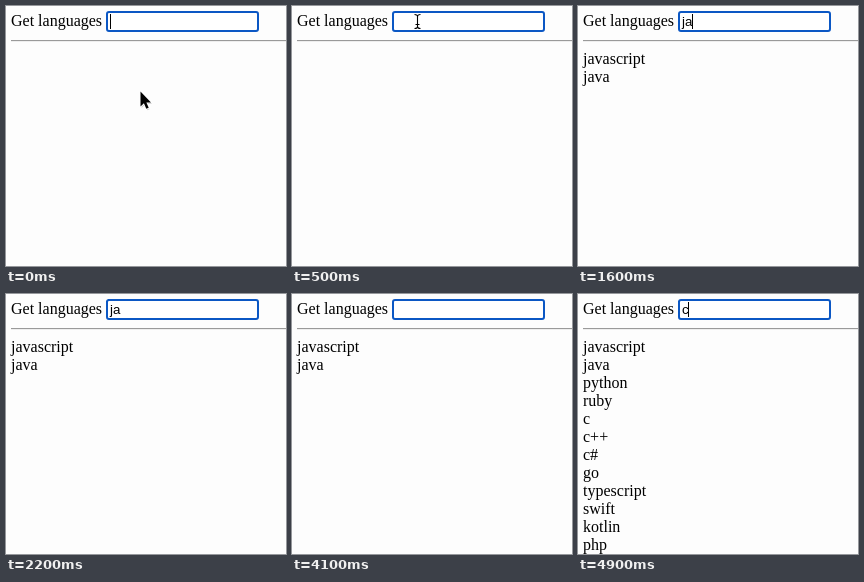
Recreate the animation shown at these times as an HTML page. Size 280 by 260 pixels, loop 5 s.

```html
<!DOCTYPE html>
<html lang="en">
<head>
<meta charset="utf-8">
<title>Language filter</title>
<style>
  html, body { margin: 0; height: 100%; overflow: hidden; background: #fdfdfd; }
  svg { display: block; }
  text { font: 16px "Liberation Serif", "Times New Roman", serif; }
  #typed { font: 13.333px "Liberation Sans", Arial, sans-serif; }
</style>
</head>
<body>
<svg width="280" height="260" viewBox="0 0 280 260">
  <text x="5" y="20">Get languages</text>
  <rect x="101" y="6" width="151" height="19" rx="2" fill="#fff" stroke="#0b57c4" stroke-width="2"/>
  <path d="M5 34.5H280" stroke="#9a9a9a"/>
  <path d="M5 35.5H280" stroke="#eee"/>
  <g id="list"></g>
  <text id="typed" x="104" y="20"></text>
  <rect id="caret" y="8" width="1" height="15"/>
  <g id="arrow" stroke-linejoin="round">
    <path d="M1 1.5V16.5L4.4 13.3L6.8 18.8L9.2 17.8L6.9 12.5H11.5Z" fill="#000" opacity=".18"/>
    <path d="M0 0V15L3.4 11.8L5.8 17.3L8.2 16.3L5.9 11H10.5Z" stroke="#fff" stroke-width="1.6" paint-order="stroke"/>
  </g>
  <g id="beam" fill="none">
    <path d="M-3-7Q0-7 0-5Q0-7 3-7M0-5V5M-3 7Q0 7 0 5Q0 7 3 7M-2 3H2" stroke="#fff" stroke-width="2.4"/>
    <path d="M-3-7Q0-7 0-5Q0-7 3-7M0-5V5M-3 7Q0 7 0 5Q0 7 3 7M-2 3H2" stroke="#000" stroke-width="1.1"/>
  </g>
</svg>
<script>
const LOOP = 5000, STEP = 100;
const $ = id => document.getElementById(id);
const languages = "javascript java python ruby c c++ c# go typescript swift kotlin php".split(" ");

// Each track lists [start time, value]
const typing = [[0, ""], [1200, "j"], [1300, "ja"], [3200, "j"], [4100, ""], [4900, "c"]];
const results = [[0, 0], [1600, 2], [4400, languages.length]];
const blink = [[0, 1], [500, 0], [1000, 1], [1500, 0], [1600, 1], [2000, 0],
  [2500, 1], [3000, 0], [3500, 1], [4000, 0], [4500, 1]];
const caretX = { "": 104, j: 106, ja: 114, c: 110 };
const path = [[134.5, 85.5], [137, 78], [137, 60], [133, 38], [127, 20], [125.5, 15.5], [133.5, 12.5], [150.5, 0.5]];

const at = (track, t) => track.findLast(([start]) => start <= t)[1];
const show = (el, on) => el.setAttribute("visibility", on ? "visible" : "hidden");

const rows = languages.map((name, i) => {
  const row = document.createElementNS("http://www.w3.org/2000/svg", "text");
  row.setAttribute("x", 5);
  row.setAttribute("y", 58 + 18 * i);
  row.textContent = name;
  return $("list").appendChild(row);
});

function drawPointer(t) {
  const [x, y] = path[Math.min(Math.floor(t / STEP), path.length - 1)];
  const visible = t < 1200, inField = y > 5 && y < 26;
  show($("arrow"), visible && !inField);
  show($("beam"), visible && inField);
  for (const id of ["arrow", "beam"]) $(id).setAttribute("transform", `translate(${x} ${y})`);
}

function draw(t) {
  const value = at(typing, t), count = at(results, t);
  $("typed").textContent = value;
  $("caret").setAttribute("x", caretX[value]);
  show($("caret"), at(blink, t));
  rows.forEach((row, i) => show(row, i < count));
  drawPointer(t);
}

const begin = performance.now();
function tick() {
  draw((performance.now() - begin) % LOOP);
  requestAnimationFrame(tick);
}
tick();
</script>
</body>
</html>
```
